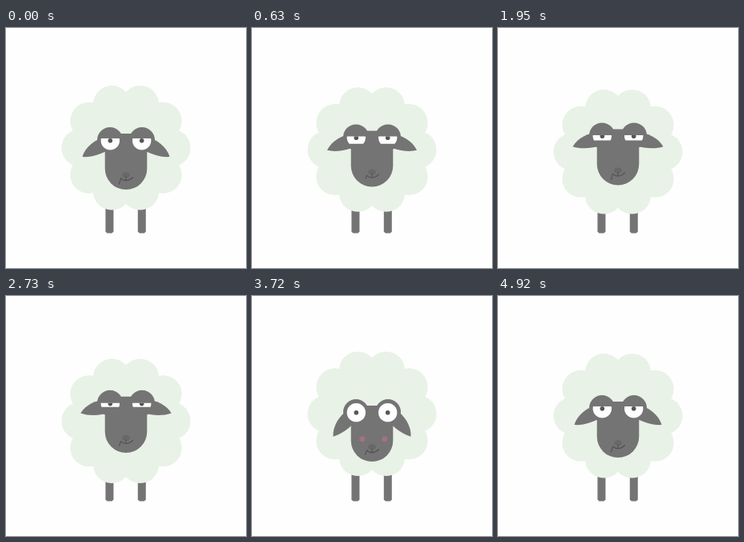
Recreate the animation shown at these times as an HTML page. Size 300 by 300 pixels, loop 4950 ms.

```html
<!DOCTYPE html>
<html lang="en">
<head>
<meta charset="utf-8">
<title>Sheep</title>
<style>
  html, body { margin: 0; width: 100%; height: 100%; overflow: hidden; background: #fefefe; }
  svg { display: block; width: 100vw; height: 100vh; }
</style>
</head>
<body>
<svg viewBox="0 0 300 300">
  <defs>
    <clipPath id="gap"><rect id="slit" x="100" width="100"/></clipPath>
    <path id="earShape" d="M5-12C-10-15-25-10-33 0C-23 5-10 6 5 4Z"/>
    <path id="leg" d="M-5 200H5V254.5L3 256.5H-3L-5 254.5Z"/>
  </defs>
  <g fill="#747474">
    <use href="#leg" x="129.4"/>
    <use href="#leg" x="169.8"/>
  </g>
  <g id="drops" fill="#333"></g>
  <g id="wool" fill="#e8f2e6"><circle r="60"/></g>
  <g id="face" fill="#747474">
    <g transform="translate(126 148.7)"><use id="earL" href="#earShape"/></g>
    <g transform="translate(174 148.7) scale(-1 1)"><use id="earR" href="#earShape"/></g>
    <circle cx="130" cy="140" r="16"/>
    <circle cx="170" cy="140" r="16"/>
    <path d="M123.7 132H176.3V175.8A26.3 26.3 0 0 1 123.7 175.8Z"/>
    <g clip-path="url(#gap)">
      <g fill="#fefefe"><circle cx="130.3" cy="140.8" r="11.7"/><circle cx="169.7" cy="140.8" r="11.7"/></g>
      <g fill="#555"><circle cx="130.3" cy="140.8" r="2.8"/><circle cx="169.7" cy="140.8" r="2.8"/></g>
    </g>
    <g id="blush" fill="#b5708c"><circle cx="137.8" cy="173.8" r="3.5"/><circle cx="165.8" cy="173.8" r="3.5"/></g>
    <ellipse cx="150" cy="183.7" rx="5" ry="3.6" fill="#686868"/>
    <path id="mouth" fill="none" stroke="#505050" stroke-width="1.1" stroke-linecap="round"/>
  </g>
</svg>
<script>
const LOOP = 4950;
const NS = 'http://www.w3.org/2000/svg';
const $ = id => document.getElementById(id);

function addCircle(parent, attrs) {
  const c = document.createElementNS(NS, 'circle');
  for (const k in attrs) c.setAttribute(k, attrs[k]);
  return parent.appendChild(c);
}

for (let i = 0; i < 10; i++) {
  const a = (i + 0.5) * Math.PI / 5;
  addCircle($('wool'), { cx: 57.2 * Math.sin(a), cy: -57.2 * Math.cos(a), r: 23.4 });
}

const drops = [[143.5, 2760], [153, 2980], [147, 3150], [156, 3320]]
  .map(([cx, start]) => ({ start, el: addCircle($('drops'), { cx, r: 1.5 }) }));

const clamp = x => Math.min(1, Math.max(0, x));
const smooth = x => (1 - Math.cos(Math.PI * clamp(x))) / 2;
const out = x => 1 - (1 - clamp(x)) ** 3;

// Eased phases: sink and squint, strain, pop open, relax, lids fall
function pose(t) {
  const sink = smooth((t - 40) / 1260);
  const squint = smooth((t - 60) / 960);
  const strain = smooth((t - 2300) / 440);
  const pop = out((t - 2770) / 300);
  const relax = smooth((t - 3810) / 1050);
  const lids = smooth((t - 4250) / 610);
  const mix = (rest, tight, hold, open, close = squint, back = relax) => {
    const v = rest + (tight - rest) * close + (hold - tight) * strain;
    const w = v + (open - v) * pop;
    return w + (rest - w) * back;
  };
  return {
    wool: mix(149.8, 154.8, 156.2, 147.3, sink),
    face: mix(0, -5.6, -6.2, 5),
    ear: mix(22, 9, 7, 42),
    top: mix(-2.8, -1.2, -0.8, -12, squint, lids),
    bottom: mix(12, 5.2, 4.2, 12, squint, lids),
    blush: 0.75 * smooth((t - 3320) / 450) * (1 - smooth((t - 4330) / 480))
  };
}

function draw(t) {
  const p = pose(t);
  $('wool').setAttribute('transform', `translate(150 ${p.wool})`);
  $('face').setAttribute('transform', `translate(0 ${p.face})`);
  for (const id of ['earL', 'earR']) $(id).setAttribute('transform', `rotate(${-p.ear})`);
  $('slit').setAttribute('y', 140.8 + p.top);
  $('slit').setAttribute('height', p.bottom - p.top);
  $('blush').setAttribute('opacity', p.blush);

  const corner = 193 + 2 * Math.cos(t / LOOP * 10 * Math.PI);
  $('mouth').setAttribute('d',
    `M150 186V190.5M141.5 ${corner}Q142.5 191 143.5 188Q151 194 158.5 186.5`);

  for (const { start, el } of drops) {
    const u = (t - start) / 350;
    el.setAttribute('cy', 222 + 26 * u + 8 * u * (u - 1));
    el.setAttribute('opacity', u > 0 && u < 1 ? 1 : 0);
  }
}

function tick() {
  draw(performance.now() % LOOP);
  requestAnimationFrame(tick);
}
tick();
</script>
</body>
</html>
```
